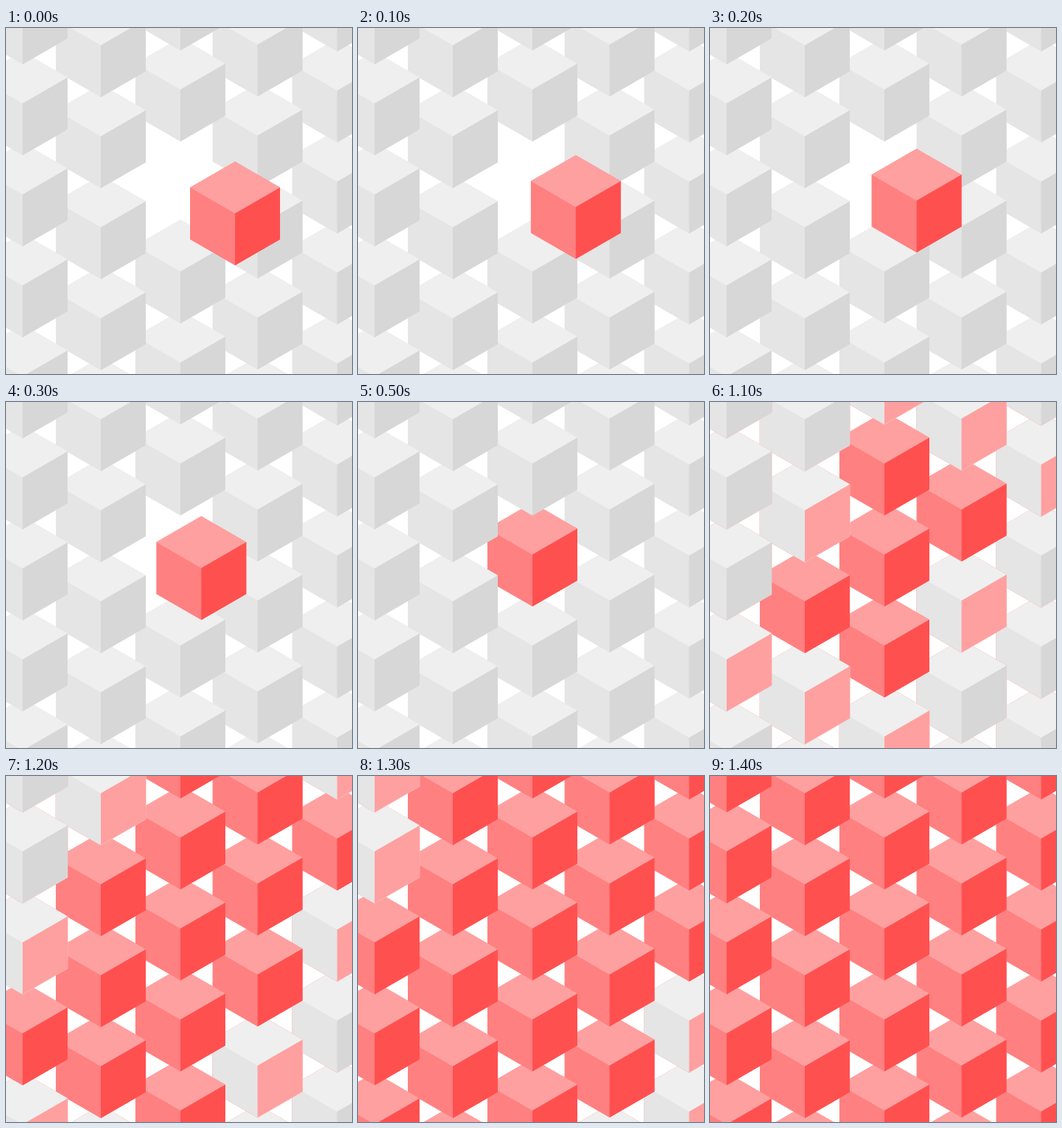
Write an HTML page with a canvas that moves like this. It is 500 px wide and 500 px high and loops after 1500 ms.

```html
<!DOCTYPE html>
<html lang="en">
<head>
<meta charset="utf-8">
<title>Cubes</title>
<style>
  html, body { margin: 0; width: 100%; height: 100%; overflow: hidden; background: #fff; }
  canvas { display: block; }
</style>
</head>
<body>
<canvas id="stage" width="500" height="500"></canvas>
<script>
  const ctx = document.getElementById('stage').getContext('2d');
  const LOOP = 1500, STEP = 100;
  const W = 65, H = 75, ROW = 131.5;

  const GRAY = { top: '#efefef', left: '#e5e5e5', right: '#d7d7d7' };
  const RED = { top: '#ffa0a0', left: '#ff8080', right: '#ff5050' };

  // Middle cube of each column; the wave starts from column 2, row 0.
  const columns = [[24, 372], [137, 288], [252, 220.5], [363.5, 155.5], [478.5, 90.5]];

  const topFace = [[0, -H], [W, -H / 2], [0, 0], [-W, -H / 2]];
  const rightFace = [[W, -H / 2], [W, H / 2], [0, H], [0, 0]];
  const outline = [[0, -H], [W, -H / 2], [W, H / 2], [0, H], [-W, H / 2], [-W, -H / 2]];

  function trace(x, y, points) {
    ctx.beginPath();
    for (const [dx, dy] of points) ctx.lineTo(x + dx, y + dy);
    ctx.closePath();
  }

  function fill(x, y, points, color) {
    trace(x, y, points);
    ctx.fillStyle = color;
    ctx.fill();
  }

  function cube(x, y, colors, fringe) {
    if (fringe) {
      trace(x, y, outline);
      ctx.strokeStyle = '#ffb4b4';
      ctx.lineWidth = 1;
      ctx.stroke();
    }
    fill(x, y, outline, colors.left);
    fill(x, y, topFace, colors.top);
    fill(x, y, rightFace, colors.right);
  }

  function colorsAt(distance, step) {
    if (step >= Math.min(10 + distance, 14) || distance === 0) return RED;
    if (step >= Math.min(9 + distance, 13)) {
      return { ...GRAY, right: step === 10 ? '#ff9696' : '#ffa0a0' };
    }
    return GRAY;
  }

  function draw(step) {
    ctx.fillStyle = '#fff';
    ctx.fillRect(0, 0, 500, 500);

    // Left columns and upper rows lie in front.
    for (let col = 4; col >= 0; col--) {
      const [x, y] = columns[col];
      for (let row = 3; row >= -3; row--) {
        const distance = Math.abs(col - 2) + Math.abs(row);
        if (distance === 0 && step < 5) continue;
        const colors = colorsAt(distance, step);
        cube(x, y + row * ROW, colors, step > 10 && colors !== RED);
      }
    }

    if (step < 5) cube(331 - 16.25 * step, 268 - 9.3 * step, RED);
  }

  let shown = -1;
  function tick() {
    const step = Math.floor(performance.now() % LOOP / STEP);
    if (step !== shown) draw(shown = step);
    requestAnimationFrame(tick);
  }
  tick();
</script>
</body>
</html>
```
